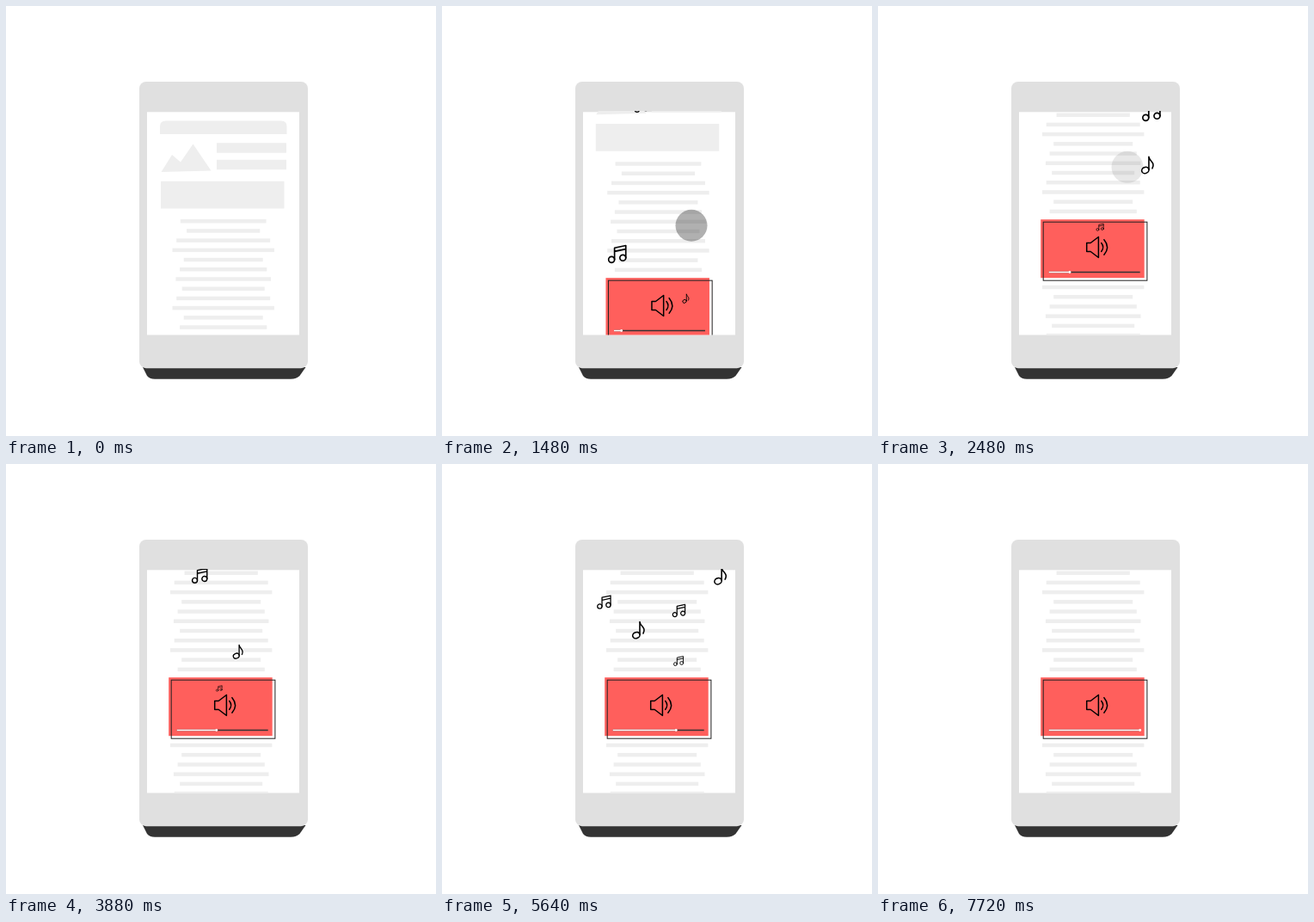
An HTML page that plays this animation: 500 by 500 pixels, repeating every 8.68 s.

```html
<!DOCTYPE html>
<html lang="en">
<head>
<meta charset="utf-8">
<title>Audio card on a phone</title>
<style>
html, body { margin: 0; width: 100%; height: 100%; overflow: hidden; background: #fff; }
svg { display: block; width: 100vw; height: 100vh; }
.ink { fill: none; stroke: #000; stroke-linecap: round; stroke-linejoin: round; }
</style>
</head>
<body>
<svg viewBox="0 0 500 500">
  <defs>
    <clipPath id="view"><rect x="164" y="122" width="177" height="260.5"/></clipPath>
    <g id="pair">
      <circle cx="-6.5" cy="6" r="3.3"/><circle cx="6" cy="4" r="3.3"/>
      <path d="M-3.200 6V-7L9.300 -9.600V4M-3.200 -3L9.300 -5.600"/>
    </g>
    <g id="single">
      <ellipse cx="-2.5" cy="5.7" rx="4.3" ry="3.5" transform="rotate(-25 -2.5 5.7)"/>
      <path d="M1.600 5V-10C2 -4.500 9.500 -3.500 5.600 3.600"/>
    </g>
  </defs>
  <path fill="#333" d="M159 420L164 430Q166.500 433.700 173 433.700H331Q338 433.700 341.500 430L348.500 420z"/>
  <rect x="155" y="88" width="196" height="333.200" rx="8" fill="#e0e0e0"/>
  <rect x="164" y="123.300" width="177" height="259.200" fill="#fff"/>
  <g clip-path="url(#view)">
    <g id="page">
      <g id="grey" fill="#eee">
        <path d="M179 149V140Q179 133.500 185.500 133.500H320Q326.500 133.500 326.500 140V149z"/>
        <path d="M180.500 193L193 173L203 181.500L217.500 160.500L238.500 191.500z"/>
        <path d="M245 159.300h81v11.500h-81zM245 178.700h81v11.500h-81zM180 203.800h143.500v31.700h-143.500z"/>
      </g>
      <g transform="translate(191.700 382.900)">
        <rect width="120.500" height="68" fill="#ff5f5c"/>
        <rect x="3" y="3" width="120.700" height="68" fill="none" stroke="#222"/>
        <path class="ink" stroke-width="1.500" d="M53.500 27.300H58L67.200 20.300V44.300L58 37.300H53.500zM70.500 27.300Q74.500 32.300 70.500 37.300M73.700 23.500Q81 32.300 73.700 41.100"/>
        <path d="M9.500 61.300H115.500" stroke="#333" stroke-width="1.500"/>
        <path id="played" stroke="#fff" stroke-width="1.700"/>
        <circle id="knob" cy="61.300" r="1.400" fill="#fff"/>
      </g>
    </g>
    <g id="notes" class="ink" stroke-width="1.600"></g>
    <circle id="finger" cx="290" r="18.500"/>
  </g>
</svg>
<script>
const LOOP = 8680, SCROLL = 134.7, TOP = 118;
const $ = id => document.getElementById(id);
const span = (t, a, b) => Math.min(1, Math.max(0, (t - a) / (b - a)));
const ease = u => u * u * (3 - 2 * u);
const scroll = t => -SCROLL * ease(span(t, 680, 2290));

function add(parent, tag, attrs) {
  const el = document.createElementNS("http://www.w3.org/2000/svg", tag);
  for (const key in attrs) el.setAttribute(key, attrs[key]);
  return parent.appendChild(el);
}

// Centred lines whose half widths repeat in a cycle
const halves = [54.5, 59.2, 46, 50.6, 55.3, 48];
function paragraph(top, count, phase, inset = 0) {
  for (let i = 0; i < count; i++) {
    const half = halves[(i + phase) % halves.length] - inset;
    add($("grey"), "rect",
      { x: 252.7 - half, y: top + i * 11.22 - 2.25, width: 2 * half, height: 4.5 });
  }
}
paragraph(250.2, 2, 4, 5.4);
paragraph(272.6, 10, 0);
paragraph(461.7, 6, 1);

// Notes leave the speaker and rise: speed in px/s, drift is the sideways
// distance at the top, bulge the extra bend halfway
const note = (shape, size, birth, speed, drift, bulge) =>
  ({ size, birth, speed, drift, bulge, el: add($("notes"), "use", { href: "#" + shape }) });
const notes = [
  note("pair", 16, 243, 240, -26, 0),
  note("pair", 21, 730, 165, 65, -81),
  note("single", 20, 1300, 155, 0, 74),
  note("pair", 18, 2250, 91, -34, 4),
  note("single", 20, 2690, 50, 69, -10),
  note("pair", 16, 3582, 57, -60, -26),
  note("single", 20, 4074, 54, -69, 8),
  note("pair", 15, 4083, 69, 4, 17),
  note("pair", 16, 4865, 63, 50, 8)
];

function drawNote({ size, birth, speed, drift, bulge, el }, t) {
  const base = 278 + SCROLL + scroll(birth);
  const rise = speed * (t - birth) / 1000, u = rise / (base - TOP);
  const on = u >= 0 && u < 1.1;
  el.setAttribute("visibility", on ? "visible" : "hidden");
  if (!on) return;
  const angle = Math.PI * u;
  const x = 258 + drift * (1 - Math.cos(angle)) / 2 + bulge * Math.sin(angle);
  const scale = size / 20 * Math.min(1, 0.3 + rise / 115);
  el.setAttribute("transform", `translate(${x} ${base - rise}) scale(${scale})`);
}

function draw(t) {
  const dy = scroll(t);
  $("page").setAttribute("transform", `translate(${dy * 0.0186} ${dy})`);

  const x = 9.5 + 106 * span(t, 920, 7720);
  $("played").setAttribute("d", `M9.5 61.3H${x}`);
  $("knob").setAttribute("cx", x);

  $("finger").setAttribute("cy", 322 + dy);
  $("finger").setAttribute("opacity", 0.31 * span(t, 200, 600) * (1 - span(t, 2290, 2560)));

  for (const n of notes) drawNote(n, t);
}

const start = performance.now();
function tick() {
  const t = (performance.now() - start) % LOOP;
  draw(Math.floor(t / 40) * 40);
  requestAnimationFrame(tick);
}
tick();
</script>
</body>
</html>
```
